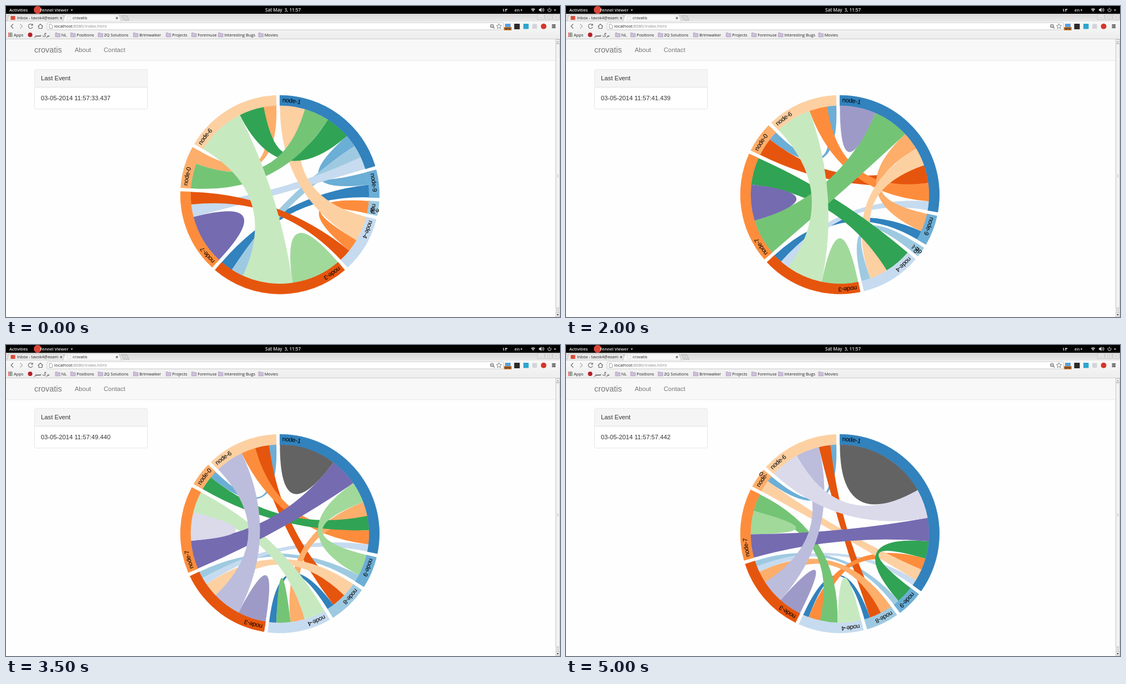
These frames come from a looping animation (998x561 px, 5.5 s). An HTML page:

```html
<!DOCTYPE html>
<html lang="en">
<head>
<meta charset="utf-8">
<title>Chord diagram</title>
<style>
  html, body { margin: 0; width: 100%; height: 100%; overflow: hidden; background: #fefefe; }
  svg { display: block; }
  text { white-space: pre; }
  .ui { font: 7.4px "Open Sans", "Noto Sans", sans-serif; fill: #222; }
  .bar { font: 600 7.6px "Open Sans", "Noto Sans", sans-serif; fill: #e8e8e8; }
  .page { font: 11.25px "Liberation Sans", Arial, sans-serif; fill: #333; }
  .nav { fill: #777; }
  .line { fill: none; stroke: #666; stroke-width: 1.1; }
</style>
</head>
<body>
<svg width="998" height="561" viewBox="0 0 998 561">
  <defs>
    <linearGradient id="strip" x2="0" y2="1"><stop stop-color="#d8d8d8"/><stop offset="1" stop-color="#e9e9e9"/></linearGradient>
    <linearGradient id="tool" x2="0" y2="1"><stop stop-color="#f8f8f8"/><stop offset="1" stop-color="#ededed"/></linearGradient>
  </defs>

  <!-- desktop bar -->
  <rect width="998" height="14" fill="#000"/>
  <circle cx="57" cy="7" r="7" fill="#d8473a"/>
  <g class="bar">
    <text x="6" y="9.8">Activities</text>
    <text x="61" y="9.8">Fennel Viewer</text>
    <text x="467" y="9.8" style="font-size:8px">Sat May  3, 11:57</text>
    <text x="894" y="9.8" font-family="DejaVu Sans, sans-serif">۱۳</text>
    <text x="916" y="9.8">en</text>
    <path d="M116.5 6.5h4l-2 2.6zM926.500 6.500h4l-2 2.600zM987 6.500h4l-2 2.600z"/>
    <path d="M945.500 5.500q4-3 8 0l-4 5z" fill="#999"/>
    <path d="M960 5.500h2l2.500-2.500v8l-2.500-2.500h-2z"/>
    <path d="M966 4.500q2 2.500 0 5M967.800 3.500q3 3.500 0 7M977 5a3 3 0 1 0 4 0M979 3v4" fill="none" stroke="#ddd"/>
  </g>

  <!-- tabs -->
  <rect y="14" width="998" height="14" fill="url(#strip)"/>
  <path d="M1 28l4-11q.5-1.500 2-1.500h94q1.500 0 2 1.500l4 11z" fill="#e9e9e9" stroke="#b4b4b4" stroke-width=".7"/>
  <path d="M208 17.500h10l4 8.500h-10z" fill="#d5d5d5" stroke="#b0b0b0" stroke-width=".7"/>
  <path d="M102 28l4-11q.5-1.500 2-1.500h94q1.500 0 2 1.500l4 11z" fill="#f8f8f8" stroke="#b4b4b4" stroke-width=".7"/>
  <rect x="8.500" y="18" width="8" height="7" fill="#dd4b39"/>
  <rect x="110.500" y="18.500" width="6" height="6.500" fill="none" stroke="#bbb" stroke-width=".7" stroke-dasharray="1"/>
  <path d="M97.500 20l3.500 3.500m0-3.500l-3.500 3.500M198 20l3.500 3.500m0-3.500l-3.500 3.500" class="line"/>
  <g fill="#e6e6e6" stroke="#bbb" stroke-width=".6">
    <rect x="957.500" y="15.500" width="12" height="9"/><rect x="971.500" y="15.500" width="12" height="9"/><rect x="985.500" y="15.500" width="11" height="9"/>
    <path d="M961 21h5M975 18h5v4h-5zM989 18l4 4m0-4l-4 4" fill="none"/>
  </g>

  <!-- toolbar and bookmarks -->
  <rect y="28" width="998" height="31.500" fill="url(#tool)"/>
  <path d="M0 59.500h998" stroke="#c4c4c4" stroke-width=".8"/>
  <rect x="74" y="30" width="822" height="13" rx="1.500" fill="#fff" stroke="#b9b9b9" stroke-width=".8"/>
  <g class="line">
    <path d="M13 32.500l-4 4 4 4"/>
    <path d="M25.500 32.500l4 4-4 4" stroke="#aaa"/>
    <path d="M47.500 34a4 4 0 1 0 .5 4M48 32v3h-3M57.500 37l4.500-4.500 4.500 4.500M59 36.500v4h6v-4"/>
    <path d="M78 33h3.500l2 2v5.500h-5.500z" stroke="#888" stroke-width=".8"/>
    <circle cx="875.500" cy="36" r="2.800"/><path d="M877.500 38l2.500 2.500M874 36h3"/>
    <path d="M888 32l1.300 3 3.300.3-2.500 2.200.8 3.300-2.900-1.800-2.900 1.800.8-3.300-2.500-2.200 3.300-.3z" stroke-width=".8"/>
    <path d="M983.500 34h6.500M983.500 36.500h6.500M983.500 39h6.500" stroke="#333" stroke-width="1.500"/>
  </g>
  <rect x="899" y="32" width="10" height="6" fill="#5aa0d8"/>
  <rect x="897" y="38" width="14" height="6" fill="#e08a3c"/>
  <text x="898" y="43" class="ui" style="font-size:5px;font-weight:700">NEW</text>
  <rect x="915.500" y="32" width="10" height="10" fill="#2c2b29"/>
  <rect x="932" y="32" width="9.500" height="9.500" fill="#2fa5cf"/>
  <rect x="948" y="32.500" width="8.500" height="8.500" fill="#d4d4d8"/>
  <circle cx="968.500" cy="36.700" r="5" fill="#d3372a"/>
  <g id="grid"></g>
  <circle cx="43.500" cy="52" r="4" fill="#b51f24"/>
  <g class="ui">
    <text x="20" y="24">Inbox - tavok4@exam</text>
    <text x="120" y="24">crovatis</text>
    <text x="87" y="39.300" style="font-size:7.800px">localhost<tspan fill="#888">:8080/index.html</tspan></text>
    <text x="14" y="54.600">Apps</text>
    <text x="51" y="54.600" font-family="DejaVu Sans, sans-serif">برگ سبز</text>
    <g id="marks"></g>
  </g>

  <!-- page -->
  <rect y="60" width="990" height="39" fill="#f8f8f8"/>
  <path d="M0 98.600h990" stroke="#e4e4e4" stroke-width=".8"/>
  <g class="page">
    <text x="51" y="84" class="nav" style="font-size:14.400px">crovatis</text>
    <text x="123.700" y="83" class="nav">About</text>
    <text x="176" y="83" class="nav">Contact</text>
    <rect x="51.400" y="114.400" width="203.500" height="71.500" rx="3" fill="#fff" stroke="#ddd" stroke-width=".8"/>
    <path d="M51.800 146.500v-29q0-2.700 2.700-2.700h197.300q2.700 0 2.700 2.700v29z" fill="#f5f5f5"/>
    <path d="M51.400 146.500h203.500" stroke="#ddd" stroke-width=".8"/>
    <text x="63" y="134">Last Event</text>
    <text x="62.700" y="170" id="stamp"></text>
  </g>
  <g id="chart" transform="translate(493.400 340.300)" class="page"></g>

  <!-- scrollbar -->
  <rect x="990" y="60" width="8" height="501" fill="#dedede"/>
  <rect x="990.500" y="68.500" width="7" height="476" rx="1" fill="#f3f3f3" stroke="#b5b5b5" stroke-width=".7"/>
  <path d="M990.500 60.500h7v7h-7zM990.500 553.500h7v7h-7z" fill="#f3f3f3" stroke="#b5b5b5" stroke-width=".7"/>
  <path d="M992 65.500h4l-2-2.500z" fill="#999"/><path d="M992 556h4l-2 2.500z" fill="#222"/>
  <path d="M992.500 304.500h3m-3 2h3m-3 2h3" stroke="#aaa" stroke-width=".6"/>
</svg>
<script>
const $ = id => document.getElementById(id);
const COLORS = ("#3182bd #6baed6 #9ecae1 #c6dbef #e6550d #fd8d3c #fdae6b #fdd0a2 #31a354 " +
  "#74c476 #a1d99b #c7e9c0 #756bb1 #9e9ac8 #bcbddc #dadaeb #636363").split(" ");
const NODES = [..."19843706"];
const OUTER = 179.1, INNER = 160.6, PAD = 0.04;
const STEP = 500;

// Links in paint order: two node digits, then the number of events between them.
const STATES = [
  "931 191 131 171 741 841 061 142 162 102 334 634 774",
  "931 191 131 741 841 061 162 142 102 173 334 634 774",
  "931 191 131 841 061 102 162 142 472 174 334 634 774",
  "931 061 841 131 191 102 162 142 112 473 174 334 634 774",
  "931 061 841 131 102 162 192 142 473 174 334 634 774 114",
  "841 061 831 131 931 862 102 162 142 193 473 174 334 634 774 114",
  "841 061 931 131 862 162 142 832 102 193 473 174 334 634 774 116",
  "841 061 931 131 862 162 142 832 102 442 193 473 174 334 634 774 118",
  "841 061 931 131 862 142 832 102 163 193 473 444 174 334 634 774 118",
  "841 061 931 131 862 142 832 102 193 473 164 444 174 334 634 774 1110",
  "841 061 931 131 862 142 832 102 193 473 774 444 174 334 634 165 1116"
].map(row => row.split(" ").map(s => ({ a: s[0], b: s[1], n: +s.slice(2) })));

const point = (r, angle) => `${(r * Math.sin(angle)).toFixed(2)} ${(-r * Math.cos(angle)).toFixed(2)}`;
const arcTo = (r, angle, sweep) => `A${r} ${r} 0 0 ${sweep} ${point(r, angle)}`;

function layout(links) {
  const rows = Object.fromEntries(NODES.map(id => [id, {}]));
  for (const { a, b, n } of links) rows[a][b] = rows[b][a] = n;
  const sum = row => Object.values(row).reduce((s, n) => s + n, 0);
  const total = NODES.reduce((s, id) => s + sum(rows[id]), 0);
  const unit = (2 * Math.PI - PAD * NODES.length) / total;
  const spans = {};
  let angle = 0;
  const groups = NODES.map(id => {
    const start = angle, row = rows[id];
    const peers = NODES.filter(p => row[p]).sort((p, q) => row[q] - row[p]);
    for (const p of peers) spans[id + p] = [angle, angle += row[p] * unit];
    const end = angle;
    angle += PAD;
    return { id, start, end };
  });
  return { groups, spans };
}

function groupSvg({ id, start, end }, i) {
  const d = `M${point(OUTER, start)}${arcTo(OUTER, end, 1)}L${point(INNER, end)}${arcTo(INNER, start, 0)}Z`;
  return `<path id="arc${id}" d="${d}" fill="${COLORS[i]}" stroke="${COLORS[i]}" stroke-width=".8"/>` +
    `<text dy="12" fill="#000"><textPath href="#arc${id}" startOffset="4.8">node-${id}</textPath></text>`;
}

function chordSvg({ a, b }, i, spans) {
  const [s0, s1] = spans[a + b], [t0, t1] = spans[b + a];
  const far = a === b ? "" : `Q0 0 ${point(INNER, t0)}${arcTo(INNER, t1, 1)}`;
  const d = `M${point(INNER, s0)}${arcTo(INNER, s1, 1)}${far}Q0 0 ${point(INNER, s0)}Z`;
  return `<path d="${d}" fill="${COLORS[i]}"/>`;
}

// Events arrive every 2 s on a slightly slow timer; the screen is sampled every 2.4 s.
function stamp(index) {
  const elapsed = 2 * Math.floor(index * 6 / 5);
  return `03-05-2014 11:57:${33 + elapsed}.${Math.floor(437.7 + elapsed * 0.2)}`;
}

function draw(index) {
  const links = STATES[index], { groups, spans } = layout(links);
  $("chart").innerHTML = groups.map(groupSvg).join("") +
    links.map((link, i) => chordSvg(link, i, spans)).join("");
  $("stamp").textContent = stamp(index);
}

const folders = [[89, "NL"], [116.5, "Positions"], [166, "ZQ Solutions"], [229.5, "Brimwalker"],
  [288.5, "Projects"], [334.5, "Foremuse"], [382.5, "Interesting Bugs"], [455, "Movies"]];
$("marks").innerHTML = folders.map(([x, name]) =>
  `<path d="M${x} 48.500h3.500l1 1.200h4v6h-8.500z" fill="#cdbfd8" stroke="#a593b5" stroke-width=".7"/>` +
  `<text x="${x + 10.7}" y="54.600">${name}</text>`).join("");
const gridColors = ["#d9534f", "#555", "#4a8f4a"];
$("grid").innerHTML = Array.from({ length: 9 }, (_, i) =>
  `<rect x="${4 + i % 3 * 2.7}" y="${48.2 + Math.floor(i / 3) * 2.7}" width="2" height="2" fill="${gridColors[i % 3]}"/>`).join("");

let shown = -1;
const began = performance.now();
function tick() {
  const index = Math.floor((performance.now() - began) / STEP) % STATES.length;
  if (index !== shown) draw(shown = index);
  requestAnimationFrame(tick);
}
tick();
</script>
</body>
</html>
```
